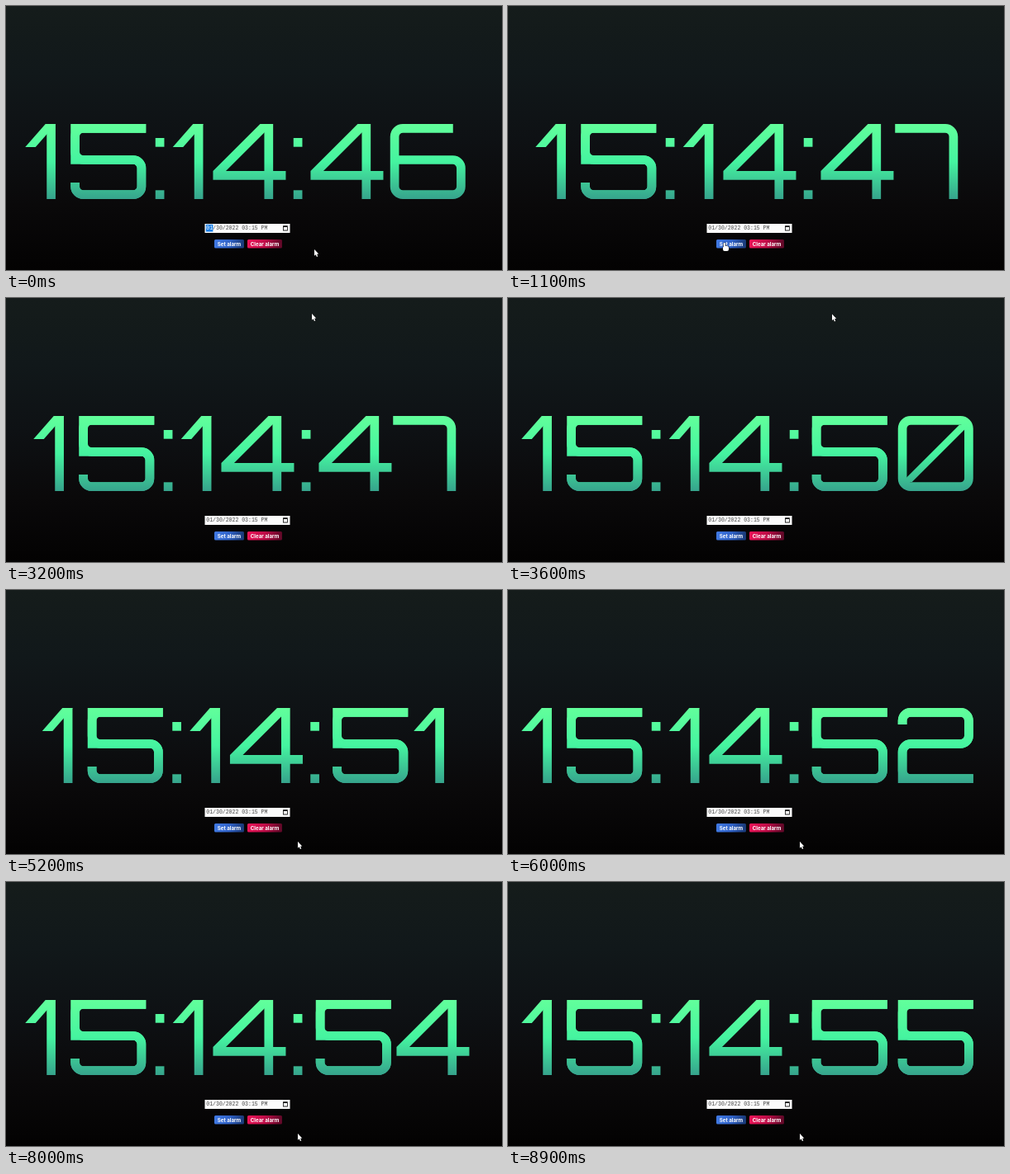
An HTML page with a canvas that plays this animation: 600 px wide and 320 px high, repeating every 9000 ms.

```html
<!DOCTYPE html>
<html lang="en">
<head>
<meta charset="utf-8">
<title>Alarm clock</title>
<style>
html, body { margin: 0; width: 600px; height: 320px; overflow: hidden; background: #0b0c0e; }
canvas { display: block; width: 600px; height: 320px; }
</style>
</head>
<body>
<canvas id="stage"></canvas>
<script>
const W = 600, H = 320, LOOP = 9000;
const canvas = document.getElementById('stage');
const dpr = window.devicePixelRatio || 1;
canvas.width = W * dpr;
canvas.height = H * dpr;
const ctx = canvas.getContext('2d');
ctx.scale(dpr, dpr);

function gradient(x0, y0, x1, y1, ...colors) {
  const g = ctx.createLinearGradient(x0, y0, x1, y1);
  colors.forEach((c, i) => g.addColorStop(i / (colors.length - 1), c));
  return g;
}

function box(x, y, w, h, r, fill) {
  ctx.fillStyle = fill;
  ctx.beginPath();
  ctx.roundRect(x, y, w, h, r);
  ctx.fill();
}

function label(text, x, y, font, color, align = 'left') {
  ctx.font = font;
  ctx.fillStyle = color;
  ctx.textAlign = align;
  ctx.fillText(text, x, y);
}

function polygon(pts) {
  pts.forEach(([x, y], i) => i ? ctx.lineTo(x, y) : ctx.moveTo(x, y));
  ctx.closePath();
}

// Clock face: every digit is HIGH tall and drawn with bars BAR thick.
const CENTER = 290, TOP = 143, HIGH = 91, WIDE = 91, BAR = 10.7, CURVE = 10;
const green = gradient(0, 0, 0, HIGH, '#62ff9b', '#45f4a0', '#36a38c');
const L = BAR / 2, R = WIDE - L, T = L, M = 43.5, B = HIGH - L;

// Bar centres by letter: six corners, then the loose ends
const nodes = {
  a: [L, T], b: [R, T], c: [L, M], d: [R, M], e: [L, B], f: [R, B],
  t: [WIDE / 2, T], u: [L, 20], w: [L, 71], x: [WIDE, T], z: [WIDE, B],
  q: [76, T], g: [R - 5, T], h: [R - 5, M], o: [0, M],
  p: [0, T], j: [76 - L, T], k: [76 - L, HIGH]
};

// Walks from node to node; capitals keep the outer corner square.
const walks = {
  0: ['tbfeat'], 2: ['uabdcEz'], 3: ['uagh', 'odfew'],
  5: ['xACdfew'], 6: ['qaefdc'], 7: ['pjk']
};

function walk(path, radius) {
  const pts = [...path].map(n => nodes[n.toLowerCase()]);
  ctx.beginPath();
  ctx.moveTo(...pts[0]);
  for (let i = 1; i < pts.length - 1; i++) ctx.arcTo(...pts[i], ...pts[i + 1], radius(path[i]));
  ctx.lineTo(...pts.at(-1));
  ctx.stroke();
}

function slant(x0, y0, x1, y1, w) {
  ctx.fillStyle = green;
  ctx.beginPath();
  polygon([[x0, y0], [x1, y1], [x1 + w, y1], [x0 + w, y0]]);
  ctx.fill();
}

const bar = (x, y, w, h) => box(x, y, w, h, 0, green);

const extras = {
  0: () => slant(5, 80, 74, 11, 12),
  1: () => { slant(0, 28, 24.5, 0, 12.5); bar(26, 0, BAR, HIGH); },
  4: () => { slant(0, 57, 57, 0, 15.5); bar(62, 0, BAR, HIGH); bar(0, 57, 88, BAR); },
  ':': () => { bar(0, 17, BAR, BAR); bar(0, HIGH - BAR, BAR, BAR); }
};

function glyph(ch, x) {
  ctx.save();
  ctx.translate(x, TOP);
  ctx.strokeStyle = green;
  ctx.lineWidth = BAR;
  for (const path of walks[ch] || []) {
    walk(path, () => CURVE);
    if (/[A-Z]/.test(path)) walk(path, n => n < 'a' ? 0 : CURVE);
  }
  if (extras[ch]) extras[ch]();
  ctx.restore();
}

// Proportional spacing, so the centred text shifts as digits change
const widths = { 1: 49, 4: 90, 7: 84, ':': 28 };
const bearings = { 1: 3, 4: 2.7, 7: 2.5, ':': 10 };
const advance = (ch, next) => (widths[ch] || 104) - (ch + next === '5:' ? 2.5 : 0);

function clock(text) {
  const chars = [...text];
  const steps = chars.map((ch, i) => advance(ch, chars[i + 1]));
  let x = CENTER - steps.reduce((a, b) => a + b) / 2;
  chars.forEach((ch, i) => {
    glyph(ch, x + (bearings[ch] || 9));
    x += steps[i];
  });
}

// The open dialog holds the clock at 47.
function second(t) {
  const held = t > 400 && t < 3400;
  return held ? 47 : 46 + Math.floor((t + 600) / 1000);
}

const backdrop = gradient(0, 0, 0, H, '#151c1b', '#11181a', '#0e1114', '#0a090a', '#030202');
const blue = gradient(252, 0, 288, 0, '#4079e4', '#3163c8', '#193875');
const red = gradient(292, 0, 334, 0, '#ea1458', '#c00d48', '#5c0826');
const BOLD = 'px Inter, "Liberation Sans", sans-serif';
const MONO = '6.5px "Liberation Mono", monospace';

function button(text, x, w, fill) {
  box(x, 283, w, 10.5, 1.5, fill);
  label(text, x + w / 2, 290.5, '700 6.2' + BOLD, '#fff', 'center');
}

function controls(t) {
  box(240.5, 264, 103, 11, 0, '#fbfbfb');
  label('01/30/2022 03:15 PM', 242.3, 271.3, MONO, '#444');
  if (t < 1000) {
    box(241.8, 264.8, 8.6, 8.8, 0, '#1b7fe6');
    label('01', 242.3, 271.3, MONO, '#fff');
  }
  box(335, 266.2, 5.8, 6.2, 0.5, '#111');
  box(335.8, 268, 4.2, 3.6, 0, '#fbfbfb');
  button('Set alarm', 252, 36, blue);
  button('Clear alarm', 292, 42, red);
}

function dialog() {
  box(195, 0, 194.5, 35.5, [0, 0, 2, 2], '#fff');
  label('Alarm set', 202, 5.3, '5.8px "Liberation Sans", sans-serif', '#62656a');
  box(354, 14, 29, 14.5, 2.2, '#a9cdfb');
  box(355, 15, 27, 12.5, 1.5, '#1c80f6');
  label('OK', 368.3, 23, '700 5' + BOLD, '#fff', 'center');
}

// Pointer moves: start, end, x, y
const home = [373, 295];
const moves = [
  [150, 900, 262, 287], [1400, 2350, 408.5, 25], [2500, 2950, 370, 19],
  [3250, 3550, 392, 19.5], [3600, 4000, 358, 298], [4050, 4500, 356, 312], [4500, 5100, 353, 305]
];

function ease(t, from, to) {
  const k = Math.min(1, Math.max(0, (t - from) / (to - from)));
  return k * k * (3 - 2 * k);
}

function pointerAt(t) {
  return moves.reduce(([x, y], [from, to, nx, ny]) => {
    const e = ease(t, from, to);
    return [x + (nx - x) * e, y + (ny - y) * e];
  }, home);
}

function arrow() {
  polygon([[0, 0], [0, 7.8], [1.7, 6.3], [2.9, 9], [4.2, 8.4], [3.1, 5.8], [5.2, 5.6]]);
}

function hand() {
  ctx.roundRect(-1, 0, 2, 7, 1);
  ctx.roundRect(-2, 4, 7, 6, 2);
}

function pointer(t) {
  ctx.save();
  ctx.translate(...pointerAt(t));
  ctx.beginPath();
  if (t > 850 && t < 2600) hand();
  else arrow();
  ctx.lineJoin = 'round';
  ctx.lineWidth = 1;
  ctx.strokeStyle = '#111';
  ctx.stroke();
  ctx.fillStyle = '#fff';
  ctx.fill();
  ctx.restore();
}

function draw(t) {
  ctx.fillStyle = backdrop;
  ctx.fillRect(0, 0, W, H);
  clock('15:14:' + second(t));
  controls(t);
  if (t >= 1300 && t < 3200) dialog();
  pointer(t);
}

const begin = performance.now();
function frame() {
  draw((performance.now() - begin) % LOOP);
  requestAnimationFrame(frame);
}
frame();
</script>
</body>
</html>
```
